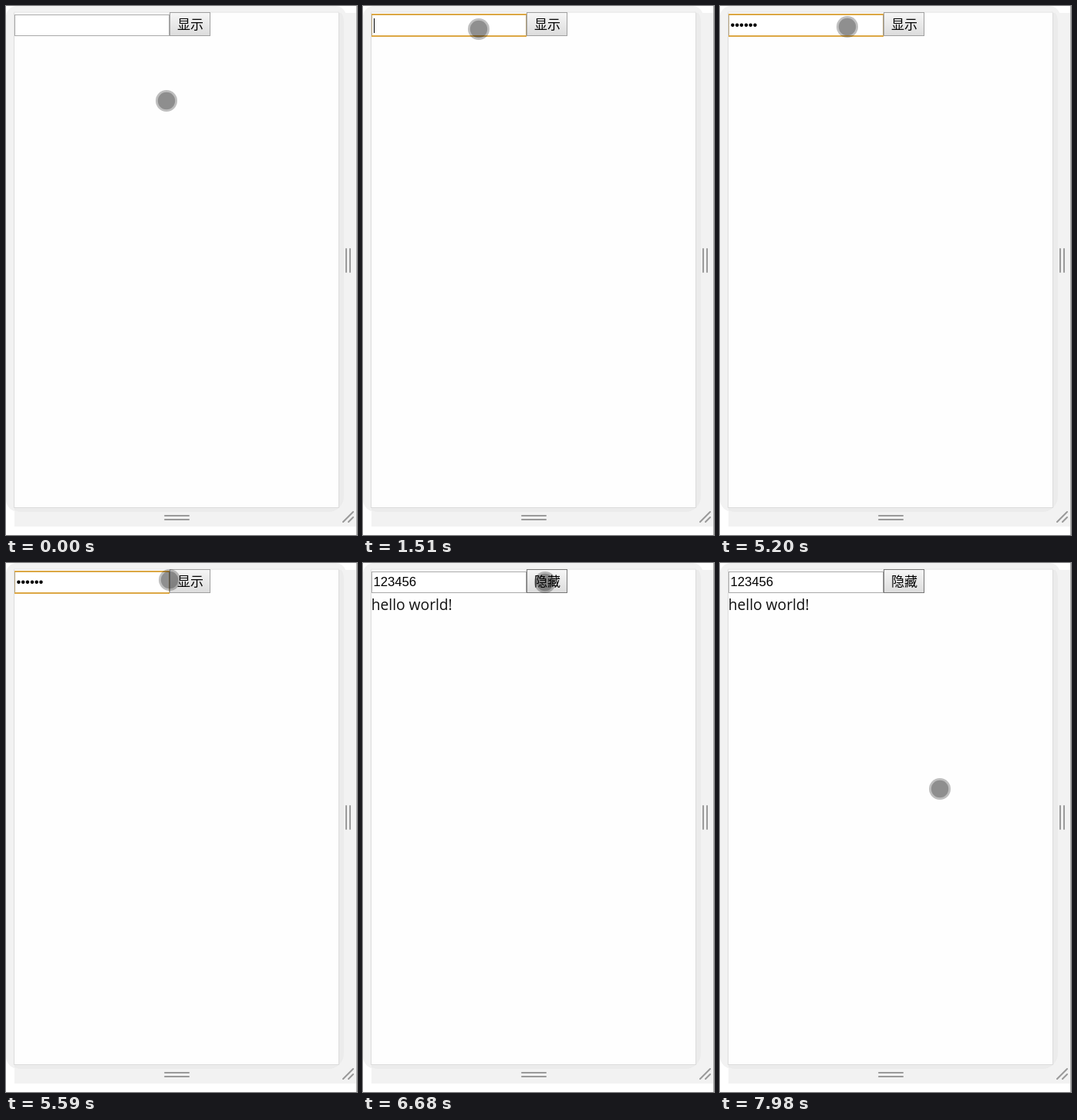
Write an HTML page that moves like this. It is 455 px wide and 686 px high and loops after 8000 ms.

```html
<!DOCTYPE html>
<html lang="zh">
<head>
<meta charset="utf-8">
<style>
  html, body { margin: 0; width: 100%; height: 100%; overflow: hidden; background: #fff; }
  svg { display: block; }
  .field { font: 16.67px "Liberation Sans", Arial, sans-serif; }
  .label { font: 17px "Noto Sans CJK SC", "Noto Sans CJK", sans-serif; }
  .hello { font: 19.2px "Open Sans", sans-serif; fill: #111; }
  .grip { stroke: #9a9a9a; stroke-width: 2; fill: none; stroke-linecap: round; }
</style>
</head>
<body>
<svg width="455" height="686" viewBox="0 0 455 686">
  <defs>
    <linearGradient id="normal" x2="0" y2="1"><stop stop-color="#f6f6f6"/><stop offset="1" stop-color="#dcdcdc"/></linearGradient>
    <linearGradient id="pressed" x2="0" y2="1"><stop stop-color="#d4d4d4"/><stop offset="1" stop-color="#ebebeb"/></linearGradient>
    <radialGradient id="touch"><stop stop-opacity=".6"/><stop offset=".5" stop-opacity=".5"/><stop offset="1" stop-opacity=".12"/></radialGradient>
    <clipPath id="edges"><path d="M431 9h24v666H11v-24h420z"/></clipPath>
  </defs>

  <!-- viewport frame and resize handles -->
  <rect width="441" height="40" rx="14" fill="#f2f2f2"/>
  <rect width="438" height="656" rx="16" fill="#f2f2f2"/>
  <path d="M431 9h23v666H11v-24h420z" fill="#f2f2f2"/>
  <rect width="438" height="656" rx="20" fill="#ebebeb" clip-path="url(#edges)"/>
  <path d="M454.5 0v686" stroke="#a6a6a6"/>
  <rect x="10.5" y="8" width="421" height="642.5" fill="#fefefe" stroke="#dcdcdc"/>
  <path d="M10 8h422" stroke="#f2f2f2"/>
  <path class="grip" d="M441 315v30M446 315v30M206 661h31M206 666h31M437 669l13-13M444 669l6-6"/>

  <!-- input -->
  <rect x="11.5" y="11.5" width="200" height="27" fill="#fff" stroke="#a9a9a9"/>
  <g id="focus">
    <path d="M11.5 11v28M211.5 11v28" stroke="#b5a27c"/>
    <path d="M11 11h201M11 39h201" stroke="#dca744" stroke-width="2"/>
  </g>
  <text id="value" class="field" x="13.4" y="30"></text>
  <rect id="caret" width="1" height="19"/>

  <!-- button and message -->
  <rect id="button" x="212.5" y="8.5" width="52" height="30"/>
  <text id="label" class="label" x="222" y="30"></text>
  <text id="hello" class="hello" x="10.8" y="61">hello world!</text>

  <g id="cursor">
    <g id="flat">
      <circle r="14" fill-opacity=".25"/>
      <circle r="11.2" fill-opacity=".25"/>
    </g>
    <circle id="glow" r="14" fill="url(#touch)"/>
  </g>
</svg>
<script>
const LOOP = 8000, FOCUS = 1510, CLICK = 6530, RELEASE = 6680;
const $ = id => document.getElementById(id);
const set = (id, attrs) => { for (const k in attrs) $(id).setAttribute(k, attrs[k]); };
const show = (id, on) => set(id, { visibility: on ? "visible" : "hidden" });

// [time, x, y]; the pointer jumps at each time
const path = [
  [0, 208, 123], [560, 184, 70], [680, 168, 40], [830, 163, 37], [980, 155, 32], [1110, 150, 30],
  [5200, 165, 27], [5350, 182, 25], [5470, 199, 23], [5590, 212, 22], [5710, 217, 20],
  [5830, 220, 21], [5970, 228, 23], [6100, 236, 25],
  [7400, 266, 52], [7550, 270, 140], [7700, 263, 182], [7850, 274, 240], [7980, 285, 293]
];
const keys = [2500, 3340, 3750, 4150, 4430, 4740];
// the caret is lit after an odd number of these
const blinks = [FOCUS, 1940, 2500, 3060, 3340, 5200, 5710, 6100];
const passed = (times, t) => times.filter(v => v <= t).length;

function draw(t) {
  const [, x, y] = path.findLast(p => p[0] <= t);
  const typed = passed(keys, t), open = t >= CLICK;
  const down = open && t < RELEASE, glow = t >= 6100 && t < RELEASE;

  set("cursor", { transform: `translate(${x} ${y})` });
  show("flat", !glow);
  show("glow", glow);

  show("focus", t >= FOCUS && !open);
  $("value").textContent = open ? "123456" : "•".repeat(typed);
  set("caret", { x: Math.max(14, Math.floor(13.3 + 5.83 * typed)), y: typed ? 15 : 16 });
  show("caret", passed(blinks, t) % 2);

  set("button", { fill: `url(#${down ? "pressed" : "normal"})`, stroke: open ? "#777" : "#a0a0a0" });
  $("label").textContent = open ? "隐藏" : "显示";
  show("hello", open);
}

function tick() {
  draw(performance.now() % LOOP);
  requestAnimationFrame(tick);
}
tick();
</script>
</body>
</html>
```
